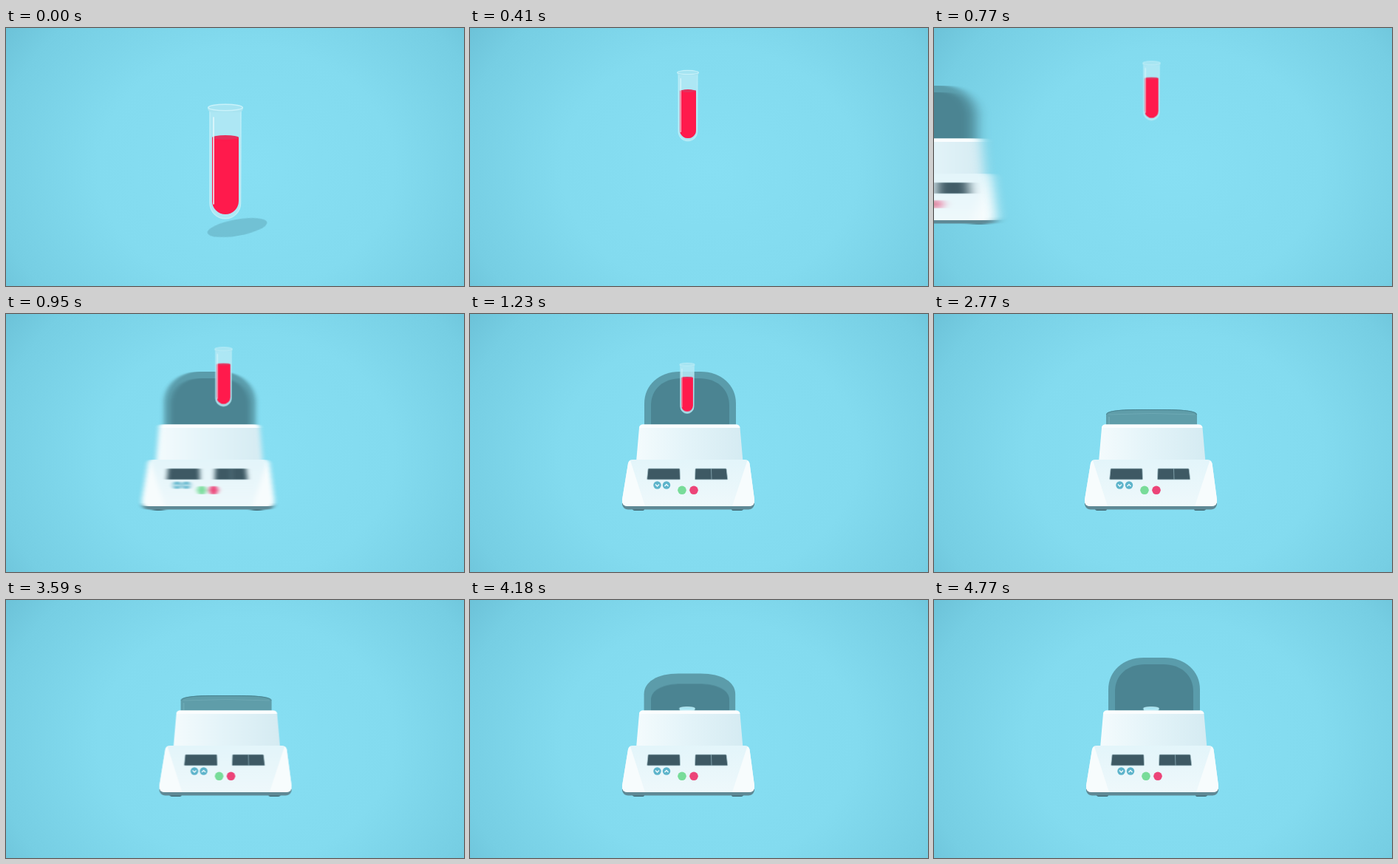
Recreate the animation shown at these times as an HTML page. Size 620 by 349 pixels, loop 4810 ms.

```html
<!DOCTYPE html>
<html lang="en">
<head>
<meta charset="utf-8">
<title>Centrifuge</title>
<style>
  @property --amp { syntax: "<length>"; inherits: false; initial-value: 0px; }
  @property --swing { syntax: "<number>"; inherits: false; initial-value: 0; }

  :root { --loop: 4810ms; }
  html, body { margin: 0; width: 100%; height: 100%; overflow: hidden; background: #82daee; }
  svg { display: block; width: 100%; height: 100%; }

  .machine {
    transform: translateX(calc(var(--amp) * var(--swing)));
    animation:
      slide var(--loop) infinite,
      smear var(--loop) step-end infinite,
      power var(--loop) linear infinite,
      swing calc(var(--loop) / 54) cubic-bezier(.37, 0, .63, 1) -80.4ms infinite alternate;
  }
  @keyframes slide {
    0%, 11.75% { translate: -420px 0; animation-timing-function: cubic-bezier(.65, 0, .35, 1); }
    22.04%, 100% { translate: 0 0; }
  }
  @keyframes smear {
    0% { filter: none; }
    12.5% { filter: url(#smear-s); }
    14.5% { filter: url(#smear-l); }
    18.4% { filter: url(#smear-s); }
    20.2%, 100% { filter: none; }
  }
  @keyframes power {
    0%, 40.5% { --amp: 0px; }
    43%, 78% { --amp: 2px; }
    81%, 100% { --amp: 0px; }
  }
  @keyframes swing { from { --swing: -1; } to { --swing: 1; } }

  .tube {
    transform: translate(297px, 103px);
    animation: travel var(--loop) infinite, tuck var(--loop) step-end infinite;
  }
  @keyframes travel {
    0%, 2% { transform: translate(297px, 103px) scale(1); animation-timing-function: cubic-bezier(.65, 0, .35, 1); }
    12.5% { transform: translate(294.5px, 45px) scale(.515); }
    22.5% { transform: translate(294.5px, 45px) scale(.515); animation-timing-function: cubic-bezier(.4, 0, .75, .7); }
    25.57% { transform: translate(294px, 66px) scale(.44); animation-timing-function: cubic-bezier(.3, .25, .5, 1); }
    30.8%, 100% { transform: translate(294px, 144.5px) scale(.45); }
  }
  @keyframes tuck {
    0% { opacity: 1; }
    38.5% { opacity: 0; }
    84%, 100% { opacity: 1; }
  }

  .shadow { transform-origin: 313px 270px; animation: lift var(--loop) infinite; }
  @keyframes lift {
    0%, 2% { opacity: .8; transform: none; animation-timing-function: ease-in-out; }
    9%, 100% { opacity: 0; transform: scale(.5); }
  }

  .lid, .inner, .crease { animation: lid var(--loop) infinite; }
  .lid { animation-name: lid; }
  .inner { animation-name: inner; transform-origin: 298px 150px; }
  .crease { animation-name: crease; }
  @keyframes lid {
    0%, 32.4% {
      d: path("M236 150V121C236 96 256 78 284 78H312C340 78 360 96 360 121V150Z");
      fill: #5a9cab; animation-timing-function: ease-in-out;
    }
    40% { 
      d: path("M235 150V136C235 132 248 129 280 129H312C344 129 358 132 358 136V150Z");
      fill: #5f9da9;
    }
    82% {
      d: path("M235 150V136C235 132 248 129 280 129H312C344 129 358 132 358 136V150Z");
      fill: #5f9da9; animation-timing-function: ease-in-out;
    }
    91%, 100% {
      d: path("M236 150V121C236 96 256 78 284 78H312C340 78 360 96 360 121V150Z");
      fill: #5a9cab;
    }
  }
  @keyframes inner {
    0%, 32.4% { transform: none; animation-timing-function: ease-in-out; }
    40% { transform: scaleY(0); }
    82% { transform: scaleY(0); animation-timing-function: ease-in-out; }
    91%, 100% { transform: none; }
  }
  @keyframes crease {
    0%, 38.8% { opacity: 0; }
    40%, 82% { opacity: 1; }
    83%, 100% { opacity: 0; }
  }
</style>
</head>
<body>
<svg viewBox="0 0 620 349" preserveAspectRatio="none">
  <defs>
    <radialGradient id="sky" gradientUnits="userSpaceOnUse" cx="0" cy="0" r="1"
      gradientTransform="translate(325 190) scale(400 330)">
      <stop offset="0" stop-color="#87dff3"/>
      <stop offset=".5" stop-color="#83dbef"/>
      <stop offset=".85" stop-color="#76cee3"/>
      <stop offset="1" stop-color="#6cc2d8"/>
    </radialGradient>
    <linearGradient id="drum">
      <stop offset="0" stop-color="#f4fbfd"/>
      <stop offset=".45" stop-color="#e4f4f9"/>
      <stop offset="1" stop-color="#d5ebf2"/>
    </linearGradient>
    <linearGradient id="case" x2="0" y2="1">
      <stop offset="0" stop-color="#e3f5fa"/>
      <stop offset="1" stop-color="#eef8fb"/>
    </linearGradient>
    <filter id="smear-s" filterUnits="userSpaceOnUse" x="150" y="60" width="300" height="220" color-interpolation-filters="sRGB">
      <feGaussianBlur stdDeviation="3 0"/>
    </filter>
    <filter id="smear-l" filterUnits="userSpaceOnUse" x="150" y="60" width="300" height="220" color-interpolation-filters="sRGB">
      <feGaussianBlur stdDeviation="8 0"/>
    </filter>
  </defs>

  <rect width="620" height="349" fill="url(#sky)"/>

  <g class="shadow" opacity=".8">
    <ellipse cx="313" cy="270" rx="41" ry="11" transform="rotate(-10 313 270)" fill="#6bb9cc"/>
  </g>

  <g class="machine">
    <path class="lid" d="M236 150V121C236 96 256 78 284 78H312C340 78 360 96 360 121V150Z" fill="#5a9cab"/>
    <path class="inner" d="M245 150V124C245 101 262 87 286 87H310C334 87 351 101 351 124V150Z" fill="#4b8492"/>
    <g class="crease" fill="none" opacity="0">
      <path d="M235.5 136C235.5 132 248 129.5 280 129.5H312C344 129.5 357.5 132 357.5 136" stroke="#47828f"/>
      <path d="M238 136Q297 133 355 136" stroke="#72adb8" stroke-width=".8"/>
      <path d="M239 149V139" stroke="#78b3be"/>
    </g>
  </g>

  <g class="tube">
    <path d="M-21 6V134A20.5 20.5 0 0 0 20.5 134L21 6Z" fill="#b4e9f5" fill-opacity=".85" stroke="#bdeef8" stroke-width="1.5"/>
    <path d="M-18 45V131A18 18 0 0 0 18 131V45Z" fill="#ff1a4c"/>
    <ellipse cy="45" rx="18" ry="3" fill="#e5305c"/>
    <path d="M-16 18V135" stroke="#e2f8fc" stroke-width="1.6" stroke-linecap="round"/>
    <path d="M-24 5Q-24 9-20 11H20Q24 9 24 5Z" fill="#a9e4f1"/>
    <ellipse cy="4.5" rx="23.3" ry="4.3" fill="#a5e4f2" stroke="#c9f2fa" stroke-width="1.5"/>
  </g>

  <g class="machine">
    <path d="M219 262H236V264Q236 266 233 266H223Q220 266 219 262ZM354 262H371Q370 266 367 266H357Q354 266 354 264Z" fill="#456e7a"/>
    <path d="M206 254H385V258Q383 264.500 377 264.500H214Q208 264.500 206 258Z" fill="#5f8995"/>
    <path d="M234 149.500H360Q365 149.500 365.500 154L369.500 200H225L229 154Q229.500 149.500 234 149.500Z" fill="url(#drum)"/>
    <path d="M229 154Q229.500 149.500 234 149.500H360Q365 149.500 365.500 154Z" fill="#fafdfe"/>
    <path d="M220 197H372Q377 197 378.500 202L385 251Q386 260 377 260H214Q205 260 206 251L214 202Q215 197 220 197Z" fill="url(#case)"/>
    <path d="M217 198L237 260H214Q205 260 206 251L214 202Q215 199 217 198ZM375.500 198L355 260H377Q386 260 385 251L378.500 202Q377.500 199 375.500 198Z" fill="#f7fcfd"/>

    <g fill="#3e5964" stroke="#a9c4cc" stroke-width=".8">
      <path d="M242 209H283Q284 209 284 210L284.500 223Q284.500 224 283.500 224H241Q239.500 224 239.700 223L241 210Q241 209 242 209Z"/>
      <path d="M306 209H346Q347 209 347.200 210L348.700 223Q349 224 348 224H305.500Q304.500 224 304.500 223L305 210Q305 209 306 209Z"/>
      <path d="M326.500 209L327 224" stroke="#8fb0ba"/>
    </g>

    <g fill="#5db4cb">
      <circle cx="253.500" cy="231.500" r="5.200"/>
      <circle cx="266" cy="231.500" r="5.200"/>
    </g>
    <path d="M251 230.500L253.500 233L256 230.500M263.500 233L266 230.500L268.500 233" fill="none" stroke="#f2fbfd" stroke-width="1.400"/>
    <circle cx="287" cy="238.300" r="5.800" fill="#78dc99"/>
    <circle cx="303" cy="238.300" r="5.800" fill="#ec4478"/>
  </g>
</svg>
</body>
</html>
```
